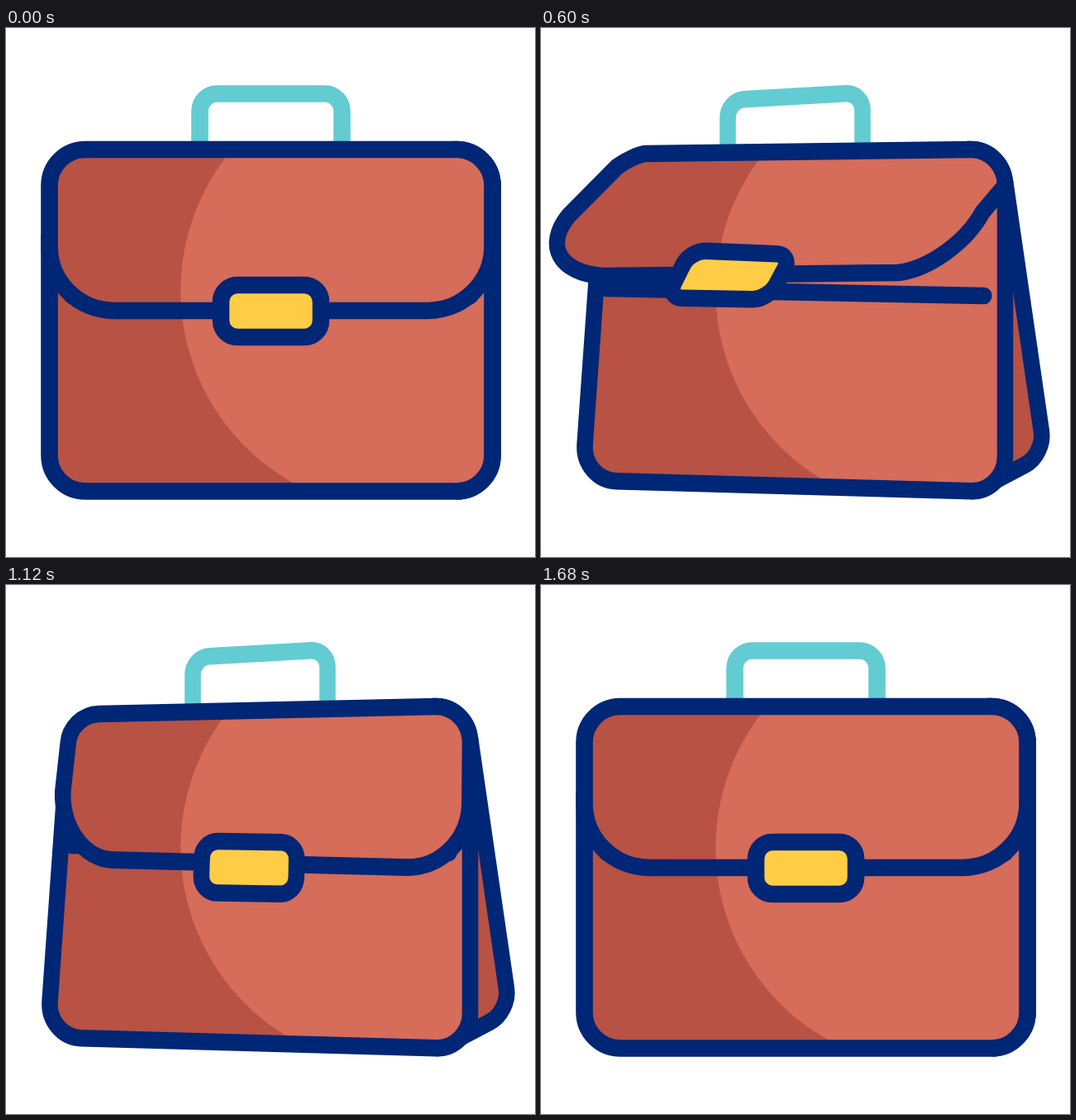
Write an HTML page with a canvas that moves like this. It is 640 by 640 pixels and loops after 2.2 s.

```html
<!DOCTYPE html>
<html lang="en">
<head>
<meta charset="utf-8">
<title>Briefcase</title>
<style>
  html, body { margin: 0; width: 100%; height: 100%; overflow: hidden; background: #fff; }
  canvas { display: block; width: 640px; height: 640px; }
</style>
</head>
<body>
<canvas></canvas>
<script>
const LOOP = 2200, STEP = 40, SIZE = 640, LEFT = 42;
const NAVY = '#002676', TEAL = '#62ccd2', RED = '#d66c5a', DARK = '#b75244', GOLD = '#ffcc45';

const canvas = document.querySelector('canvas');
const ctx = canvas.getContext('2d');
const dpr = window.devicePixelRatio || 1;
canvas.width = canvas.height = SIZE * dpr;

// Flap outline (9 points, from the top left corner round to the right shoulder), then the clasp (4 points).
const FRONT = [
  96, 147, 52.5, 147, 52.5, 190.5, 52.5, 264, 52.5, 342, 131, 342, 510, 342, 588.5, 342, 588.5, 264,
  260, 311, 381, 311, 381, 374, 260, 374];
const CLOSED = [
  115.6, 156, 78.8, 157, 76.7, 192, 71, 250, 69.4, 331, 134.6, 333, 509, 342, 588.5, 343, 588.5, 264,
  248.7, 310, 369, 312, 368, 374.5, 247, 372.5];
const WIDE = [
  131.4, 152, 115.6, 153, 94.6, 168, 33, 227, -23, 293, 75.7, 300, 452, 296, 522, 289, 559.6, 223,
  187.7, 269, 317.6, 274, 287, 328.5, 157.7, 326.5];
const AJAR = [
  115.6, 156, 92.5, 157, 82, 187, 42, 246, 6, 318, 111.4, 322, 489, 330, 542.7, 328, 567, 248,
  218.7, 297, 343, 300, 329, 362, 206, 359];

const FLAP_STEPS = [
  [0, FRONT], [320, CLOSED], [600, WIDE], [780, CLOSED],
  [960, AJAR], [1140, CLOSED], [1220, CLOSED], [1680, FRONT]];

const mix = (a, b, k) => a + (b - a) * k;
const clamp = k => Math.min(1, Math.max(0, k));
const sine = k => (1 - Math.cos(Math.PI * clamp(k))) / 2;

// cubic-bezier(.4, 0, .2, 1)
function glide(x) {
  x = clamp(x);
  let lo = 0, hi = 1;
  for (let i = 0; i < 24; i++) {
    const s = (lo + hi) / 2, r = 1 - s;
    if (1.2 * r * r * s + 0.6 * r * s * s + s * s * s < x) lo = s; else hi = s;
  }
  return lo * lo * (3 - 2 * lo);
}

const turnAt = t => t < 1200 ? glide(t / 580) : 1 - sine((t - 1220) / 460);

function flapAt(t) {
  const i = FLAP_STEPS.findIndex(step => step[0] > t);
  if (i < 0) return FRONT;
  const [t0, a] = FLAP_STEPS[i - 1], [t1, b] = FLAP_STEPS[i];
  const k = sine((t - t0) / (t1 - t0));
  return a.map((v, j) => mix(v, b[j], k));
}

function corner(path, a, v, b) {
  const K = 0.552;
  path.lineTo(...a);
  path.bezierCurveTo(
    mix(a[0], v[0], K), mix(a[1], v[1], K),
    mix(b[0], v[0], K), mix(b[1], v[1], K), ...b);
}

function toward(p, q, d) {
  const k = d / Math.hypot(q[0] - p[0], q[1] - p[1]);
  return [mix(p[0], q[0], k), mix(p[1], q[1], k)];
}

// Polyline of [x, y, radius]; points without a radius stay sharp.
function rounded(pts, closed) {
  const path = new Path2D(), n = pts.length;
  pts.forEach((p, i) => {
    if (!p[2]) return path.lineTo(p[0], p[1]);
    const prev = pts[(i + n - 1) % n], next = pts[(i + 1) % n];
    corner(path, toward(p, prev, p[2]), [p[0], p[1]], toward(p, next, p[2]));
  });
  if (closed) path.closePath();
  return path;
}

function flapPath(p) {
  const path = new Path2D();
  corner(path, p[0], p[1], p[2]);
  corner(path, p[3], p[4], p[5]);
  corner(path, p[6], p[7], p[8]);
  corner(path, [588.5, 190.5], [588.5, 147], [545, 147]);
  path.closePath();
  return path;
}

function view(sx) {
  ctx.setTransform(dpr * sx, 0, 0, dpr, dpr * LEFT * (1 - sx), 0);
}

function outline(path, color) {
  ctx.strokeStyle = color;
  ctx.stroke(path);
}

// The light circle keeps its place while the leather moves.
function leather(path, sx) {
  ctx.fillStyle = DARK;
  ctx.fill(path);
  ctx.save();
  ctx.clip(path);
  view(1);
  ctx.fillStyle = RED;
  ctx.beginPath();
  ctx.arc(477.7, 318, 266.5, 0, 7);
  ctx.fill();
  ctx.restore();
  outline(path, NAVY);
}

function draw(t) {
  const k = turnAt(t), sx = 1 - 0.0494 * k;
  const at = (a, b) => mix(a, b, k);
  const flat = flapAt(t), pts = [];
  for (let i = 0; i < flat.length; i += 2) pts.push([flat[i], flat[i + 1]]);

  view(1);
  ctx.fillStyle = '#fff';
  ctx.fillRect(0, 0, SIZE, SIZE);
  view(sx);
  ctx.lineWidth = 20.6;
  ctx.lineJoin = 'round';
  ctx.lineCap = 'butt';

  outline(rounded([
    [at(234.5, 235.5), 150],
    [at(234.5, 235.5), at(79.5, 87.4), 21],
    [at(406.5, 407), at(79.5, 78.2), 21],
    [at(406.5, 407), 150]]), TEAL);

  const side = rounded([
    [588.5, 185],
    [at(588.5, 639), at(560.5, 516), at(43.5, 28)],
    [at(545, 550), 560.5]]);
  ctx.fillStyle = DARK;
  ctx.fill(side);
  outline(side, NAVY);

  const base = at(560.5, 561.5);
  leather(rounded([
    [at(52.5, 72.5), 250],
    [at(52.5, 50.4), at(560.5, 547), 43.5],
    [588.5, base, 43.5],
    [588.5, 147, 43.5],
    [540, 147]]), sx);

  ctx.lineCap = 'round';
  outline(rounded([[at(80, 82), at(324, 315)], [561.5, 324]]), NAVY);

  leather(flapPath(pts), sx);

  const clasp = rounded(pts.slice(9).map(p => [...p, 20]), true);
  ctx.fillStyle = GOLD;
  ctx.fill(clasp);
  outline(clasp, NAVY);
}

const start = performance.now();
function tick() {
  const t = (performance.now() - start) % LOOP;
  draw(Math.floor(t / STEP) * STEP);
  requestAnimationFrame(tick);
}
tick();
</script>
</body>
</html>
```
